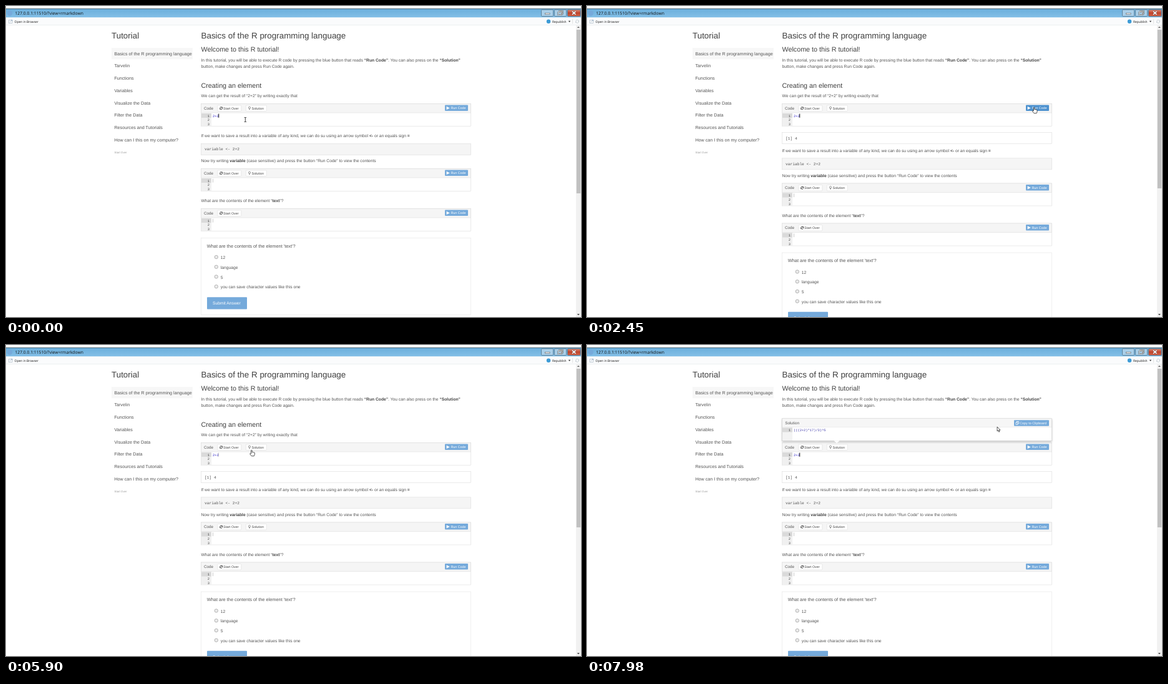
Recreate the animation shown at these times as an HTML page. Size 921 px wide and 498 px high, loop 8 s.

```html
<!DOCTYPE html>
<html lang="en">
<head>
<meta charset="utf-8">
<title>R tutorial</title>
<style>
  html, body { margin: 0; width: 100%; height: 100%; overflow: hidden; background: #fff; }
  svg { display: block; width: 100vw; height: 100vh; }
  text { font-family: "Liberation Sans", Arial, sans-serif; fill: #555; text-rendering: geometricPrecision; white-space: pre; }
  .ui { font-family: "Open Sans", "Noto Sans", sans-serif; fill: #111; }
  .mono { font-family: "Liberation Mono", "Courier New", monospace; }
  .bold { font-weight: bold; fill: #444; }
</style>
</head>
<body>
<svg id="stage" viewBox="0 0 921 498" preserveAspectRatio="none"></svg>
<script>
const LOOP = 8000, STEP = 136.6, SHIFT = 23.5;
const BLUE = '#75aadb', HOVER = '#4c91cf', LEFT = 312.5, WIDTH = 432;

const text = (x, y, size, str, attrs = '') =>
  `<text x="${x}" y="${y}" font-size="${size}" ${attrs}>${str}</text>`;
const rect = (x, y, w, h, fill, attrs = '') =>
  `<rect x="${x}" y="${y}" width="${w}" height="${h}" fill="${fill}" ${attrs}/>`;
const path = (d, attrs) => `<path d="${d}" ${attrs}/>`;
const group = (id, body, attrs = '') => `<g id="${id}" ${attrs}>${body}</g>`;
const bold = str => `<tspan class="bold">${str}</tspan>`;
const body = (y, str) => text(LEFT, y, 6.71, str);
const heading = (x, y, size, str) => text(x, y, size, str, 'style="fill:#404040"');
const mono = (x, y, size, str, color = '#555') =>
  text(x, y, size, str, `class="mono" style="fill:${color}"`);

const frame = (y, h, fill, stroke = '#ddd') =>
  rect(LEFT, y, WIDTH, h, fill, `stroke="${stroke}" stroke-width=".6"`);

const refresh = (x, y, color, r = 2) => `<g transform="translate(${x} ${y})">` +
  path(`M${-r} -.3A${r} ${r} 0 0 1 ${r * .7} ${-r * .7}M${r} .3A${r} ${r} 0 0 1 ${-r * .7} ${r * .7}`,
    `fill="none" stroke="${color}" stroke-width=".9"`) +
  path(`M${r + .4} -2.4v2.3h-2.2zM${-r - .4} 2.4v-2.3h2.2z`, `fill="${color}"`) + '</g>';

const bulb = (x, y) =>
  `<circle cx="${x}" cy="${y - .7}" r="1.6" fill="none" stroke="#555" stroke-width=".6"/>` +
  path(`M${x - .8} ${y + 1.5}h1.6m-1.3 .8h1`, 'stroke="#555" stroke-width=".7"');

const smallButton = (x, w, label, icon) =>
  rect(x, 2.5, w, 9.5, '#fff', 'rx="1" stroke="#ddd" stroke-width=".6"') + icon +
  text(x + 9.3, 9, 5.37, label, 'style="fill:#444"');

const runButton = id => group(id,
  rect(703, 2, 37, 9.6, BLUE, 'rx="1" class="face"') +
  path('M705.6 4.2l5.2 2.7-5.2 2.7z', 'fill="#fff" class="play"') +
  `<g class="spin" visibility="hidden">${refresh(708.3, 6.8, '#fff')}</g>` +
  text(712.4, 8.8, 5.37, 'Run Code', 'style="fill:#fff"'));

// Exercise panel, drawn relative to its top edge.
const exercise = (id, y, solution) => `<g transform="translate(0 ${y})">` +
  frame(0, 36, '#fff') + rect(LEFT, 0, WIDTH, 14.5, '#f5f5f5', 'stroke="#ddd" stroke-width=".6"') +
  text(317, 9.3, 6.27, 'Code') +
  smallButton(338.8, 38, 'Start Over', refresh(344.6, 7.2, '#333')) +
  (solution ? smallButton(384.3, 33, 'Solution', bulb(390, 7)) : '') +
  runButton(id) +
  rect(313, 15, 16, 21, '#f0f0f0') + rect(313, 15.5, 16, 7, '#dadada') +
  [1, 2, 3].map(n => mono(322.8, 14.3 + n * 6.75, 5.37, n, '#444')).join('') +
  rect(331.2, 16.3, .6, 5.8, '#aaa', `id="${id}Mark"`) + '</g>';

const menu = ['Basics of the R programming language', 'Tarvelin', 'Functions', 'Variables',
  'Visualize the Data', 'Filter the Data', 'Resources and Tutorials', 'How can I this on my computer?'];
const answers = ['12', 'language', '5', 'you can save character values like this one'];

const windowBar =
  `<defs><linearGradient id="bar" x2="0" y2="1"><stop stop-color="#6aaedb"/>
   <stop offset="1" stop-color="#83bfe7"/></linearGradient>
   <linearGradient id="red" x2="0" y2="1"><stop stop-color="#dc8a76"/>
   <stop offset=".5" stop-color="#c0432b"/><stop offset="1" stop-color="#d4664a"/></linearGradient>
   <filter id="soft" x="-5%" y="-20%" width="110%" height="150%"><feGaussianBlur stdDeviation="1.6"/></filter></defs>` +
  rect(0, 4, 921, 14.5, 'url(#bar)') + rect(0, 3.9, 921, .8, '#43545f') +
  '<circle cx="6" cy="11.3" r="4.4" fill="#75aadb"/>' +
  text(14.5, 14, 6.75, '127.0.0.1:11510/?view=rmarkdown', 'class="ui"') +
  [857.5, 878.5, 899.5].map((x, i) => rect(x, 6, i < 2 ? 19 : 20.5, 10.5,
    i < 2 ? '#a9cfe9' : 'url(#red)', 'rx="1.2" stroke="#49687d" stroke-width=".7"')).join('') +
  rect(863.5, 11.3, 7.5, 2, '#fff', 'stroke="#444" stroke-width=".5"') +
  [[886.3, 8], [884.3, 9.6]].map(([x, y]) =>
    rect(x, y, 5.6, 4.6, '#a9cfe9', 'stroke="#444" stroke-width="1.5"') +
    rect(x, y, 5.6, 4.6, 'none', 'stroke="#fff" stroke-width=".7"')).join('') +
  path('M907 8.7l5.5 5m0-5l-5.5 5', 'stroke="#533" stroke-width="2.4"') +
  path('M907 8.7l5.5 5m0-5l-5.5 5', 'stroke="#fff" stroke-width="1.6"') +
  rect(0, 18.5, 921, 12, '#fafbfc') + rect(0, 30, 921, .6, '#e3e6e9') +
  rect(4.5, 22.8, 5.5, 4.6, '#fff', 'stroke="#9fb0bf" stroke-width=".6"') +
  path('M6 26l4-3.6m-2.2 0h2.2v2', 'fill="none" stroke="#8aa5bd" stroke-width=".6"') +
  text(13.6, 26.8, 4.9, 'Open in Browser', 'class="ui"') +
  '<circle cx="869" cy="24.8" r="3.2" fill="#3c9bd6"/>' +
  text(875, 26.8, 4.9, 'Republish', 'class="ui"') +
  path('M900.8 23.8h3.4l-1.7 2.2z', 'fill="#333"') + rect(907.5, 21, .5, 7.5, '#ccc') +
  refresh(915, 24.8, '#c3ccd2', 2.5);

const scrollbar = rect(913, 30.5, 8, 467.5, '#f1f1f1') +
  rect(913.8, 38, 6.4, 262, '#c1c1c1', 'id="thumb"') +
  path('M914.8 35h4l-2-2.3z', 'fill="#666"') + path('M914.8 493h4l-2 2.3z', 'fill="#444"');

const sidebar = heading(169, 52, 13.42, 'Tutorial') + rect(169, 67, 130, 18.3, '#f7f7f7') +
  menu.map((item, i) => text(173.4, 78.7 + i * 19.7, 7.2, item)).join('') +
  text(173.5, 236, 4.4, 'Start Over', 'style="fill:#999"');

const intro = heading(LEFT, 52, 13.42, 'Basics of the R programming language') +
  heading(LEFT, 73, 10.74, 'Welcome to this R tutorial!') +
  body(88.8, `In this tutorial, you will be able to execute R code by pressing the blue button that reads ${bold('“Run Code”')}. You can also press on the ${bold('“Solution”')}`) +
  body(99.3, 'button, make changes and press Run Code again.') +
  heading(LEFT, 131.2, 10.74, 'Creating an element') +
  body(146.3, 'We can get the result of “2+2” by writing exactly that') +
  exercise('run', 156.5, true) + mono(331, 177.5, 5.37, '2+2', '#2a1fc8') +
  rect(340.2, 172.6, 1, 6.2, '#111', 'id="caret"') +
  group('output', frame(202.5, 18, '#fff') + mono(318, 213.6, 6.22, '[1] 4'));

const quiz = frame(371.5, 123, '#fff', '#e4e4e4') +
  text(321.8, 386.8, 7.38, "What are the contents of the element 'text'?") +
  answers.map((label, i) => {
    const y = 402 + i * 15.75;
    return `<circle cx="336.8" cy="${y}" r="2.7" fill="#ececec" stroke="#999" stroke-width=".7"/>` +
      text(343.8, y + 3, 6.71, label);
  }).join('') +
  rect(322, 466.3, 64, 19.2, BLUE, 'rx="1"') +
  text(331, 478.3, 6.71, 'Submit Answer', 'style="fill:#fff"');

const lower = group('lower',
  body(210.3, `If we want to save a result into a variable of any kind, we can do su using an arrow symbol ${bold('&lt;-')} or an equals sign ${bold('=')}`) +
  frame(220.3, 18, '#f5f5f5') + mono(318, 231, 6.22, 'variable &lt;- 2+2') +
  body(250.3, `Now try writing ${bold('variable')} (case sensitive) and press the button “Run Code” to view the contents`) +
  exercise('second', 260.5, true) +
  body(314.3, `What are the contents of the element “${bold('text')}”?`) +
  exercise('third', 324.5, false) + quiz);

const popover = group('popover',
  rect(LEFT, 119, WIDTH, 36, '#000', 'opacity=".28" filter="url(#soft)"') +
  frame(117.8, 35.7, '#fff', '#ccc') + rect(313, 118, 431, 13.3, '#f6f6f6') +
  rect(313, 131.3, 431, .5, '#ddd') + text(317.3, 127.4, 6.27, 'Solution') +
  rect(313, 132, 16, 21, '#f3f3f3') + rect(313, 132.5, 16, 7, '#dadada') +
  mono(322.8, 138.2, 5.37, '1', '#444') + mono(331, 138.2, 5.37, '(((2+2)*17)/3)^5', '#3a35a8') +
  path('M395.5 153.2l4.5 4 4.5-4z', 'fill="#fff"') +
  rect(684, 120.2, 56, 9.6, BLUE, 'rx="1"') +
  rect(688.6, 122.5, 2.8, 3.6, 'none', 'stroke="#fff" stroke-width=".7"') +
  rect(687, 124, 2.8, 3.6, BLUE, 'stroke="#fff" stroke-width=".7"') +
  text(693.2, 127, 5.37, 'Copy to Clipboard', 'style="fill:#fff"'));

const outlined = 'fill="#fff" stroke="#111" stroke-width=".7" stroke-linejoin="round"';
const cursors = group('cursor',
  group('beam', path('M-1.7 -3.5h1.3l.4 .4.4-.4h1.3M0 -3.2v6.4M-1.7 3.5h1.3l.4-.4.4 .4h1.3',
    'fill="none" stroke="#111" stroke-width=".8"')) +
  group('hand', path('M-1.7 1V-4.2q.9-1 1.6 0V-1.2q.8-.6 1.4 .1 .8-.5 1.4 .2 1-.2 1.3 .7V2.2L3 4.8H-1L-3.8 1.2q.5-1.3 2.1-.2z', outlined)) +
  group('arrow', path('M-2 -4V3L-.4 1.6 .7 4.2 1.9 3.7 .8 1.2H3z', outlined)));

const $ = id => document.getElementById(id);
$('stage').innerHTML = windowBar + scrollbar + sidebar + intro + lower + popover + cursors;

// Pointer way points: time, x, y.
const route = [
  [0, 383.3, 182], [546, 383.3, 182], [820, 430, 198], [1093, 560, 201], [1366, 680, 179], [1640, 717, 167],
  [2596, 717, 167], [2732, 690, 173], [3005, 470, 202], [3278, 348, 214], [3680, 348, 214], [3825, 336.4, 212.5],
  [4234, 336.4, 212.5], [4644, 376, 222], [4780, 376, 222], [5327, 390, 201], [5870, 394.3, 173],
  [6010, 394.3, 173], [6147, 397, 170], [7000, 397, 170], [7240, 450, 166], [7650, 625, 143], [7900, 659, 135]
];
const shapes = [[0, 'beam'], [820, 'arrow'], [1500, 'hand'], [2720, 'arrow'], [3280, 'beam'], [5620, 'hand'], [7120, 'arrow']];
const caretOff = [[260, 680], [1230, 1640], [2720, 3140], [7250, 7660]];
const within = (t, a, b) => t >= a && t < b;
const show = (el, on) => el.setAttribute('visibility', on ? 'visible' : 'hidden');

function pointerAt(t) {
  const next = route.findIndex(p => p[0] > t);
  if (next < 0) return route.at(-1).slice(1);
  const [t0, x0, y0] = route[next - 1], [t1, x1, y1] = route[next];
  const k = (t - t0) / (t1 - t0);
  return [x0 + (x1 - x0) * k, y0 + (y1 - y0) * k];
}

const run = $('run');
const [face, play, spin] = ['.face', '.play', '.spin'].map(s => run.querySelector(s));
show($('runMark'), false);

function draw(t) {
  const [x, y] = pointerAt(Math.floor((t + 20) / STEP) * STEP);
  $('cursor').setAttribute('transform', `translate(${x} ${y})`);
  const shape = shapes.findLast(s => s[0] <= t)[1];
  for (const id of ['beam', 'hand', 'arrow']) show($(id), id === shape);

  const done = t >= 2450, busy = within(t, 2180, 2450);
  show($('output'), done);
  $('lower').setAttribute('transform', `translate(0 ${done ? SHIFT : 0})`);
  $('thumb').setAttribute('height', done ? 254 : 262);

  face.setAttribute('fill', within(t, 1500, 2720) ? HOVER : BLUE);
  run.setAttribute('opacity', busy ? .65 : 1);
  show(play, !busy);
  show(spin, busy);

  const blurred = within(t, 3690, 6300);
  $('caret').setAttribute('fill', blurred ? '#999' : '#111');
  $('caret').setAttribute('width', blurred ? .6 : 1);
  show($('caret'), !caretOff.some(([a, b]) => within(t, a, b)));
  show($('popover'), t >= 6430);
}

const start = performance.now();
function tick() {
  draw((performance.now() - start) % LOOP);
  requestAnimationFrame(tick);
}
tick();
</script>
</body>
</html>
```
